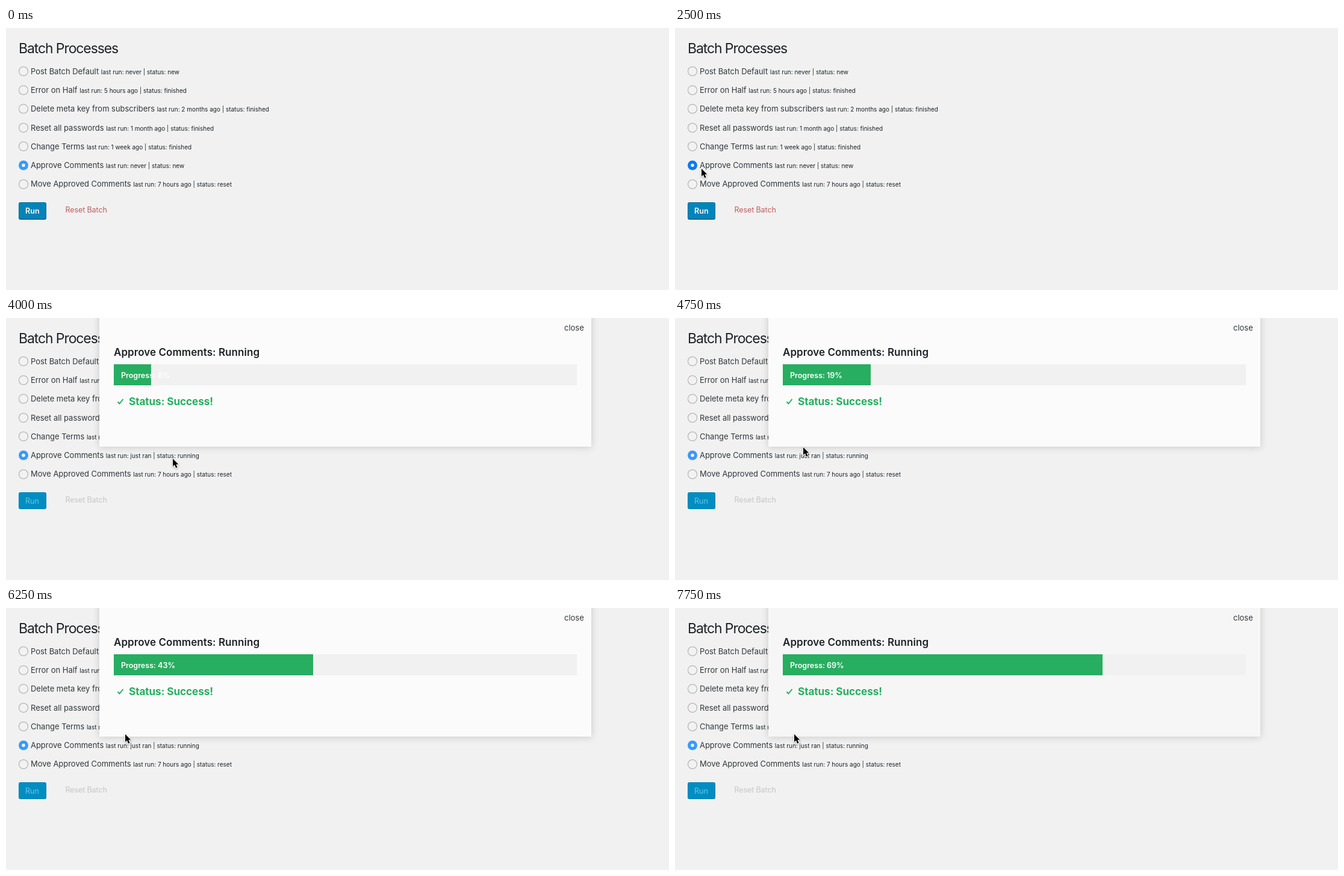
These frames come from a looping animation (1101 by 436 pixels, 8000 ms). An HTML page with a canvas:

```html
<!DOCTYPE html>
<html lang="en">
<head>
<meta charset="utf-8">
<title>Batch Processes</title>
<style>
html, body { margin: 0; width: 100%; height: 100%; overflow: hidden; background: #f1f1f1; }
canvas { display: block; }
</style>
</head>
<body>
<canvas id="stage" width="1101" height="436"></canvas>
<script>
const ctx = document.getElementById('stage').getContext('2d');
const LOOP = 8000, STEP = 250;
const ENTER = 250, OPEN = 3250, FIRST_RESULT = 3750;
const GREEN = '#27ae60', INK = '#32373c', DARK = '#1d2227';
const SELECTED = 5;

const rows = [
  ['Post Batch Default', 'never', 'new'],
  ['Error on Half', '5 hours ago', 'finished'],
  ['Delete meta key from subscribers', '2 months ago', 'finished'],
  ['Reset all passwords', '1 month ago', 'finished'],
  ['Change Terms', '1 week ago', 'finished'],
  ['Approve Comments', 'never', 'new'],
  ['Move Approved Comments', '7 hours ago', 'reset']
];

// Each pointer move eases to a point; sag bends it downwards on the way
const moves = [
  { from: 250, to: 1000, x: 62, y: 230, sag: 110 },
  { from: 1500, to: 2500, x: 44, y: 234, sag: 74 },
  { from: 2500, to: 3000, x: 41, y: 308, sag: 0 },
  { from: 3250, to: 4000, x: 277, y: 234, sag: 0 },
  { from: 4000, to: 5250, x: 198, y: 210, sag: 0 }
];

function pointerAt(t) {
  let x = 600, y = 12;
  for (const m of moves) {
    if (t <= m.from) break;
    const k = Math.min(1, (t - m.from) / (m.to - m.from));
    const ease = 1 - (1 - k) ** 1.8;
    x += (m.x - x) * ease;
    y += (m.y - y) * ease + m.sag * Math.sin(Math.PI * k);
  }
  return [Math.round(x), Math.round(y)];
}

// The batch speeds up slightly as it runs
function percentAt(t) {
  const s = (t - 4000) / STEP;
  return Math.max(0, Math.round(8 + 3.6 * s + 0.031 * s * s));
}

function text(str, x, y, size, color, weight = 400, spacing = 0) {
  ctx.font = `${weight} ${size}px Inter, sans-serif`;
  ctx.letterSpacing = spacing + 'px';
  ctx.fillStyle = color;
  ctx.fillText(str, x, y);
  return x + ctx.measureText(str).width;
}

function disc(x, y, r, color) {
  ctx.fillStyle = color;
  ctx.beginPath();
  ctx.arc(x, y, r, 0, Math.PI * 2);
  ctx.fill();
}

function box(x, y, w, h, r, color) {
  ctx.fillStyle = color;
  ctx.beginPath();
  ctx.roundRect(x, y, w, h, r);
  ctx.fill();
}

function radio(y, on, pressed) {
  disc(29, y, 8, !on ? '#a9a9a9' : pressed ? '#0a7af5' : '#3b99fc');
  disc(29, y, on ? 2.7 : 7, on ? '#fff' : '#f2f2f2');
}

function list(t) {
  text('Batch Processes', 21, 42, 23, DARK, 400, -1.1);
  rows.forEach(([name, last, status], i) => {
    const y = 72 + i * 31.3, on = i === SELECTED;
    if (on && t >= OPEN) [last, status] = ['just ran', 'running'];
    radio(Math.round(y * 2) / 2, on, t === 2500);
    const base = Math.round(y + 4.6);
    const x = text(name + ' ', 41, base, 13, INK, 400, -0.03);
    text(`last run: ${last} | status: ${status}`, x, base, 10, DARK);
  });
}

function buttons(busy) {
  const h = busy ? 28 : 29;
  box(21, 290, 46, h, 3, busy ? '#007cb2' : '#006799');
  box(22, 291, 44, 26, 2, busy ? '#008ec2' : '#0085ba');
  if (!busy) text('Run', 32, 310, 12.6, '#006799', 600);
  text('Run', 32, 309, 12.6, busy ? '#66c6e4' : '#fff', busy ? 400 : 600);
  text('Reset Batch', 98.5, 307, 12.5, busy ? '#c6c6c6' : '#c05c5c', 400, -0.1);
}

function modal(t) {
  ctx.save();
  ctx.shadowColor = 'rgba(0,0,0,.17)';
  ctx.shadowBlur = 12;
  ctx.shadowOffsetY = 1;
  ctx.fillStyle = t >= 7000 ? '#f6f6f6' : '#fbfbfb';
  ctx.fillRect(155, -20, 817, 234);
  ctx.restore();

  text('close', 927, 21, 13, INK);
  text('Approve Comments: Running', 179, 63, 17, DARK, 600, 0.06);
  const pct = percentAt(t);
  ctx.fillStyle = '#f1f1f1';
  ctx.fillRect(179, 77, 769, 35);
  ctx.fillStyle = GREEN;
  ctx.fillRect(179, 77, Math.round(7.69 * pct), 35);
  text(`Progress: ${pct}%`, 191, 100, 12.6, '#fff', 600, -0.05);

  if (t < FIRST_RESULT) return;
  ctx.strokeStyle = GREEN;
  ctx.lineWidth = 2;
  ctx.stroke(new Path2D('M185.5 139.5L188.5 142.5L194.5 135'));
  text('Status: Success!', 204, 145, 17.2, GREEN, 700, -0.1);
}

const arrow = new Path2D('M0 0V13L3 10.2L5.2 15.6L7.6 14.6L5.4 9.4H9.4Z');

function pointer(x, y) {
  ctx.save();
  ctx.translate(x, y);
  ctx.lineJoin = 'round';
  ctx.lineWidth = 2;
  ctx.strokeStyle = '#fff';
  ctx.shadowColor = 'rgba(0,0,0,.3)';
  ctx.shadowBlur = 3;
  ctx.shadowOffsetY = 1;
  ctx.stroke(arrow);
  ctx.shadowColor = 'transparent';
  ctx.fillStyle = '#000';
  ctx.fill(arrow);
  ctx.restore();
}

function draw(now) {
  const t = Math.floor((now % LOOP) / STEP) * STEP;
  ctx.fillStyle = '#f1f1f1';
  ctx.fillRect(0, 0, 1101, 436);
  list(t);
  buttons(t >= OPEN);
  if (t >= OPEN) modal(t);
  if (t >= ENTER) pointer(...pointerAt(t));
}

const start = performance.now();
function tick() {
  draw(performance.now() - start);
  requestAnimationFrame(tick);
}
tick();
</script>
</body>
</html>
```
